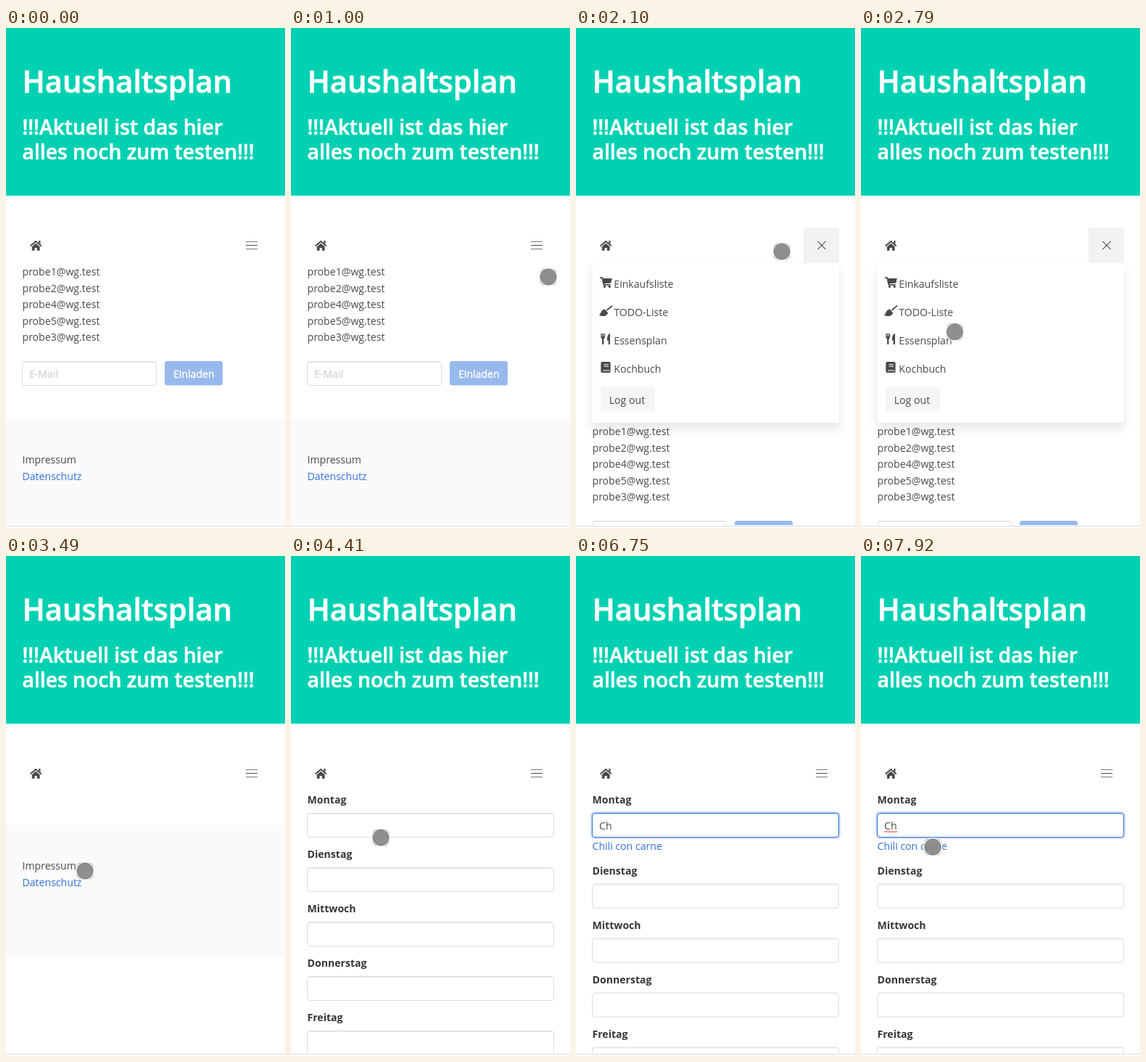
Write an HTML page that moves like this. It is 385 by 689 pixels and loops after 8000 ms.

```html
<!DOCTYPE html>
<html lang="de">
<head>
<meta charset="utf-8">
<title>Haushaltsplan</title>
<style>
  html, body { margin: 0; width: 100%; height: 100%; overflow: hidden; background: #fff; }
  svg { display: block; width: 385px; height: 689px; }
  text { font: 14.1px "Open Sans", "Noto Sans", sans-serif; fill: #4a4a4a; white-space: pre; }
  .title { font-size: 41.7px; font-weight: 600; fill: #fff; stroke: #fff; stroke-width: .8px; }
  .sub { font-size: 28.3px; font-weight: 600; fill: #fff; stroke: #fff; stroke-width: .6px; }
  .label { font-weight: 700; fill: #363636; }
  .link { fill: #3273dc; }
  .hint { fill: #c9c9c9; }
  .white { fill: #fff; stroke: #fff; stroke-width: .35px; }
  .icon { fill: #4a4a4a; stroke: none; }
  .line { fill: none; stroke: #4a4a4a; }
  .menu { filter: drop-shadow(0 8px 7px rgba(10, 10, 10, .1)); }
</style>
</head>
<body>
<script>
const LOOP = 8000;
const T = {
  open: 1630, leave: 3400, days: 3950, focus: 4890, hide: 5660,
  typeC: 5890, suggest: 5970, typeH: 6290, spell: 7300, back: 7450
};
const EDGE = 22.5, WIDE = 340;

function add(parent, tag, attrs = {}, text = "") {
  const node = document.createElementNS("http://www.w3.org/2000/svg", tag);
  for (const key in attrs) node.setAttribute(key, attrs[key]);
  node.textContent = text;
  parent.append(node);
  return node;
}
const group = (parent, cls = "") => add(parent, "g", { class: cls });
const write = (parent, x, y, text, cls = "") => add(parent, "text", { x, y, class: cls }, text);
const rect = (parent, x, y, width, height, fill, rx = 0) =>
  add(parent, "rect", { x, y, width, height, fill, rx });
const path = (parent, d, cls, width = 1) =>
  add(parent, "path", { d, class: cls, "stroke-width": width });
const show = (node, on) => { node.style.display = on ? "" : "none"; };
const shift = (node, y) => node.setAttribute("transform", `translate(0 ${y})`);

function field(parent, y, width) {
  const x = EDGE;
  path(parent, `M${x + 2} ${y + 1.5}h${width - 4}`, "line").style.stroke = "#ededed";
  const box = rect(parent, x, y + .5, width, 33, "none", 3.5);
  box.setAttribute("stroke", "#dbdbdb");
  return box;
}

const svg = add(document.body, "svg", { viewBox: "0 0 385 689" });

// Page area, cut off above the bottom edge line
const clip = add(add(svg, "defs"), "clipPath", { id: "page" });
rect(clip, 0, 0, 385, 685, "#000");
const page = group(svg);
page.setAttribute("clip-path", "url(#page)");

const footer = group(page);
rect(footer, 0, 538, 385, 181, "#fafafa");
write(footer, EDGE, 600, "Impressum");
write(footer, EDGE, 623, "Datenschutz", "link");

rect(page, 0, 0, 385, 231, "#00d1b2");
write(page, EDGE, 89, "Haushaltsplan", "title");
write(page, EDGE, 147, "!!!Aktuell ist das hier", "sub");
write(page, EDGE, 181, "alles noch zum testen!!!", "sub");

// Member list with invitation form
const list = group(page);
[1, 2, 4, 5, 3].forEach((n, i) =>
  write(list, EDGE, Math.round(341 + i * 22.5), `probe${n}@wg.test`));
field(list, 459, 185);
write(list, 32, 482, "E-Mail", "hint");
rect(list, 219, 459, 80, 33.5, "#98b9ed", 3.5);
write(list, 231, 482, "Einladen", "white");

// Week plan
const days = group(page);
write(days, EDGE, 341, "Montag", "label");
const ring = rect(days, EDGE - 1, 353.5, WIDE + 2, 35, "none", 4.5);
ring.setAttribute("stroke", "rgba(50,115,220,.25)");
ring.setAttribute("stroke-width", 3);
const monday = field(days, 354, WIDE);
const typed = write(days, 32, 377, "");
const squiggle = path(days, "M32 381" + "l1.5 -2l1.5 2".repeat(6), "line", .9);
squiggle.style.stroke = "#e33";
const caret = rect(days, 32, 362, 1, 18, "#222");
const suggestion = write(days, EDGE, 405, "Chili con carne", "link");
const rest = group(days);
["Dienstag", "Mittwoch", "Donnerstag", "Freitag"].forEach((name, i) => {
  write(rest, EDGE, 416 + i * 75, name, "label");
  field(rest, 429 + i * 75, WIDE);
});

// Navigation bar
path(page, "M33.6 300.4L41.2 294L48.8 300.4", "line", 2);
path(page, "M45.2 293h2.3v5l-2.3-2zM35.8 301.2L41.2 296.7L46.6 301.2V306.8H42.8V303H39.6V306.8H35.8z", "icon");

const menu = group(page);
const panel = group(menu, "menu");
rect(panel, EDGE, 324, 340.5, 220, "#fff");
rect(menu, 314, 275, 49, 49, "#f2f2f2");
["Einkaufsliste", "TODO-Liste", "Essensplan", "Kochbuch"].forEach((name, i) =>
  write(menu, 52.3, 358 + i * 39, name));
rect(menu, 34, 495, 75, 33.5, "#f5f5f5", 3);
write(menu, 45.8, 518, "Log out");

// Cart, broom, cutlery, book
path(menu, "M33 344.2h3.2l2.2 9.6h9.2", "line", 1.8);
path(menu, "M36.4 345H49.8L48.2 351.5L38 352.3z", "icon");
for (const cx of [39.4, 46.2]) add(menu, "circle", { cx, cy: 356.4, r: 1.6, class: "icon" });
path(menu, "M50 382.6L42.5 389", "line", 1.9);
path(menu, "M39.6 387.2l4.6 5.2c-1 2.7-3 4.3-6 4.6q-3.4 .2-6.3-.8l2-1.3-1.8-.5c2.3-1 2.5-3.4 4-5.4z", "icon");
path(menu, "M35 421v5M37.2 421v5M39.4 421v5", "line", 1.4);
path(menu, "M34.3 425h5.8q0 3-1.7 3.8v6q0 1.4-1.2 1.4t-1.2-1.4v-6q-1.7-.8-1.7-3.8zM47 421v14.2q0 1-1.2 1t-1.2-1v-4.7h-1.8q-.2-8.5 4.2-9.5z", "icon");
rect(menu, 34.3, 460, 13.3, 15, "#4a4a4a", 2);
path(menu, "M38.5 463.7h6.5M38.5 466.2h6.5M37 472h9.5", "line", 1.1).style.stroke = "#fff";

const bars = [-5, 0, 5].map(y => ({ y, node: path(page, "M-8 0h16", "line") }));

// Touch pointer
const pointer = group(svg);
add(pointer, "circle", { r: 13.3, fill: "rgba(255,255,255,.75)", stroke: "rgba(0,0,0,.35)",
  "stroke-width": .9, "stroke-dasharray": "8.4 12.49", "stroke-dashoffset": -6.25 });
add(pointer, "circle", { r: 11.3, fill: "rgba(90,90,90,.68)", stroke: "rgba(100,100,100,.5)" });

rect(svg, 0, 686, 385, 1, "#d9d9d9");

// start, end, steps, from, to, ease-out power
const moves = [
  [380, 690, 5, [334, 658], [365, 383], 1.4],
  [1000, 1380, 6, [355, 343], [346.5, 300], 1.4],
  [2100, 2860, 11, [284, 308], [125.5, 421.5], 1.6],
  [2940, 3090, 3, [121, 426], [109, 434], 1],
  [T.days, 4180, 4, [112, 425], [125, 391], 1],
  [4410, 4720, 5, [124, 388], [111, 365], 1],
  [T.back, 7920, 7, [110, 374], [99, 401], 1]
];

function placePointer(t) {
  const move = moves.filter(m => t >= m[0]).pop();
  show(pointer, move && (t < T.hide || t >= T.back));
  if (!move) return;
  const [start, end, steps, from, to, power] = move;
  const n = steps - 1;
  const part = Math.min(1, Math.floor((t - start) / (end - start) * n + .1) / n);
  const eased = 1 - (1 - part) ** power;
  const [x, y] = from.map((v, i) => v + (to[i] - v) * eased);
  pointer.setAttribute("transform", `translate(${x} ${y})`);
}

function caretOn(t) {
  const last = [T.focus, T.typeC, T.typeH].filter(s => t >= s).pop();
  if (!last) return false;
  const blink = last === T.typeH ? 460 : 550;
  return t < last + blink || (last === T.typeH && t >= T.spell && t < T.spell + 540);
}

function draw(t) {
  const open = t >= T.open && t < T.leave;
  show(menu, open);
  show(list, t < T.leave);
  shift(list, open ? 220 : 0);
  show(footer, t < T.days);
  shift(footer, open ? 220 : t < T.leave ? 0 : -168);

  const turn = open ? Math.min(1, (t - T.open + 40) / 120) : 0;
  for (const { y, node } of bars) {
    node.setAttribute("transform",
      `translate(339 ${299.5 + y * (1 - turn)}) rotate(${-Math.sign(y) * 45 * turn})`);
    node.style.opacity = y ? 1 - .25 * (1 - turn) : 1 - turn;
  }

  show(days, t >= T.days);
  const focused = t >= T.focus;
  show(ring, focused);
  monday.setAttribute("stroke", focused ? "#3273dc" : "#dbdbdb");
  typed.textContent = t >= T.typeH ? "Ch" : t >= T.typeC ? "C" : "";
  show(suggestion, t >= T.suggest);
  shift(rest, t >= T.suggest ? 22.5 : 0);
  show(squiggle, t >= T.spell);
  show(caret, caretOn(t));
  caret.setAttribute("x", t >= T.typeH ? 50 : t >= T.typeC ? 41 : 32);
  placePointer(t);
}

const begin = performance.now();
function tick() {
  draw((performance.now() - begin) % LOOP);
  requestAnimationFrame(tick);
}
tick();
</script>
</body>
</html>
```
